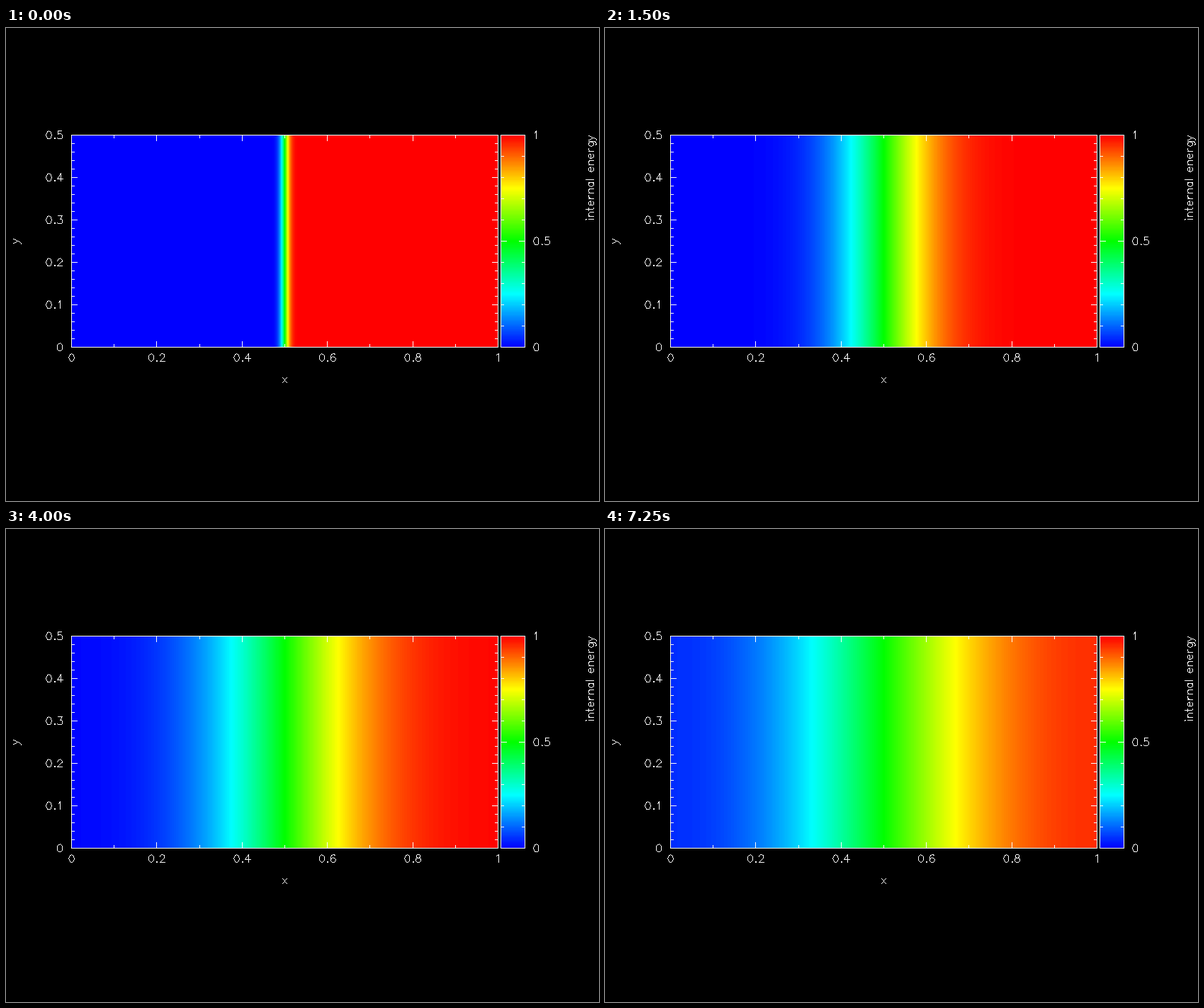
Recreate the animation shown at these times as a matplotlib script. Size 837 by 669 pixels, loop 7.5 s.

```python
import math
import numpy as np
import matplotlib.pyplot as plt
from matplotlib.animation import FuncAnimation
from matplotlib.colors import LinearSegmentedColormap, ListedColormap

W, H, DPI = 837, 669, 64
LEFT, RIGHT, TOP, BOTTOM = 92, 694, 151, 451
BAR_L, BAR_R = 698, 732
CAP, MID = 21, 14                        # capital and small letter heights
SCALE = 0.52                             # pixels per glyph unit
STEP_MS, STEPS = 250, 30
VAR_START, VAR_RATE = 0.00012, 0.00217   # squared width of the front

ink = np.zeros((H, W))


def stroke(points):
    """Rasterise a polyline, one pixel wide."""
    p = np.floor(np.array(points, float)).astype(int)
    for a, b in zip(p, p[1:]):
        n = max(abs(b - a).max(), 1)
        t = np.linspace(0, 1, n + 1)[:, None]
        x, y = np.floor(a + (b - a) * t + 0.5).astype(int).T
        ink[y, x] = 1


def arc(cx, cy, rx, ry, start=0, end=360):
    a = np.radians(np.linspace(start, end, 13))
    return list(zip(cx + rx * np.cos(a), cy + ry * np.sin(a)))


def stem(x, top=MID):
    return [(x, top), (x, 0)]


def dot(x, y):
    return arc(x, y, 1, 1)


def glyph(c):
    """Strokes of one single-line character on its baseline."""
    bowl = arc(9, 7, 6, 7)
    match c:
        case ".": return [dot(6, 1)]
        case "0": return [arc(10, 10.5, 7, 10.5)]
        case "1": return [[(6, 17), *stem(11, CAP)]]
        case "2": return [arc(10, 15, 6, 6, 180, -35) + [(3, 0), (17, 0)]]
        case "3": return [[(5, CAP), (16, CAP), *arc(10, 6.5, 7, 6.5, 90, -150)]]
        case "4": return [stem(13, CAP), [(13, CAP), (3, 7), (18, 7)]]
        case "5": return [[(15, CAP), (5, CAP), *arc(10, 7, 7, 7, 140, -150)]]
        case "6": return [arc(11, 10.5, 7, 10.5, 50, 180) + arc(10.5, 6.5, 6.5, 6.5, 180, 540)]
        case "8": return [arc(10, 16.5, 5.5, 4.5), arc(10, 6, 7, 6)]
        case "a": return [stem(15), bowl]
        case "e": return [[(3, 8), *arc(9, 7, 6, 7, 8, 318)]]
        case "g": return [bowl, [(15, MID), *arc(10, -2, 5, 5, 0, -140)]]
        case "i": return [stem(4), dot(4, CAP)]
        case "l": return [stem(4, CAP)]
        case "n": return [stem(4), arc(9.5, 8, 5.5, 6, 180, 0) + [(15, 0)]]
        case "r": return [stem(4), arc(11, 7, 7, 7, 180, 80)]
        case "t": return [[(5, CAP), *arc(9, 4, 4, 4, 180, 280)], [(2, MID), (9, MID)]]
        case "x": return [[(3, MID), (14, 0)], [(14, MID), (3, 0)]]
        case "y": return [[(2, MID), (8, 0)], [(14, MID), (8, 0), (5, -6), (1, -7)]]
    return []


def advance(c, strokes):
    if c.isdigit():
        return 20
    return 3 + max((x for pts in strokes for x, _ in pts), default=13)


def text(s, x, y, align=0.0, upright=True):
    """Write s with its baseline at (x, y); align 0 start, 0.5 middle, 1 end."""
    shapes = [glyph(c) for c in s]
    widths = [advance(c, g) for c, g in zip(s, shapes)]
    pen = -align * sum(widths)
    for strokes, width in zip(shapes, widths):
        for pts in strokes:
            u, v = (np.array(pts) + (pen, 0)).T * SCALE
            stroke(np.column_stack([x + u, y - v] if upright else [x - v, y - u]))
        pen += width


def box(x0, x1):
    stroke([(x0, TOP), (x1, TOP), (x1, BOTTOM), (x0, BOTTOM), (x0, TOP)])


def x_ticks(count, major):
    for i in range(1, count):
        x = round(LEFT + (RIGHT - LEFT) * i / count)
        n = 4 if i % major else 8
        stroke([(x, TOP), (x, TOP + n)])
        stroke([(x, BOTTOM), (x, BOTTOM - n)])


def y_ticks(x0, x1, count, major):
    for i in range(1, count):
        y = round(BOTTOM - (BOTTOM - TOP) * i / count)
        n = 4 if i % major else 8
        stroke([(x0, y), (x0 + n, y)])
        stroke([(x1, y), (x1 - n, y)])


def draw_axes():
    box(LEFT, RIGHT)
    box(BAR_L, BAR_R)
    x_ticks(10, 2)
    y_ticks(LEFT, RIGHT, 25, 5)
    y_ticks(BAR_L, BAR_R, 10, 5)
    base = BOTTOM + 5.9
    for i in range(6):
        text(f"{i / 5:g}", LEFT + (RIGHT - LEFT) * i / 5 + 0.5, 471.5, 0.5)
        text(f"{i / 10:g}", 81.3, base - 60 * i, 1)
    for i in range(3):
        text(f"{i / 2:g}", 743, base - 150 * i)
    text("x", 393.5, 501.5, 0.5)
    text("y", 17.5, 301.5, 0.5, upright=False)
    text("internal energy", 829.5, 150.5, 1, upright=False)


erf = np.vectorize(math.erf)
xs = np.linspace(0, 1, RIGHT - LEFT + 1)


def energy(step):
    """Diffused step at x = 0.5 between two insulated walls."""
    width = math.sqrt(2 * (VAR_START + VAR_RATE * step))
    total = sum(erf((xs - 0.5 - m) / width) - erf((xs - 1.5 - m) / width)
                for m in (-2, 0, 2))
    return total[None, :] / 2


def held_step(frame):
    """Each third of the loop skips one more step between updates."""
    third, pos = divmod(frame, 10)
    return frame - pos % (third + 1)


fig = plt.figure(figsize=(W / DPI, H / DPI), dpi=DPI, facecolor="black")
ax = fig.add_axes([0, 0, 1, 1])
ax.axis("off")

rainbow = LinearSegmentedColormap.from_list(
    "rainbow_bar", ["blue", "cyan", "lime", "yellow", "red"])
style = dict(vmin=0, vmax=1, interpolation="nearest", aspect="auto")
field = ax.imshow(energy(0), cmap=rainbow,
                  extent=(LEFT, RIGHT + 1, BOTTOM + 1, TOP), **style)
ax.imshow(np.linspace(1, 0, BOTTOM - TOP + 1)[:, None], cmap=rainbow,
          extent=(BAR_L, BAR_R + 1, BOTTOM + 1, TOP), **style)

draw_axes()
ax.imshow(np.ma.masked_equal(ink, 0), cmap=ListedColormap(["white"]),
          extent=(0, W, H, 0), **style)
ax.set_xlim(0, W)
ax.set_ylim(H, 0)


def update(frame):
    field.set_data(energy(held_step(frame)))
    return [field]


anim = FuncAnimation(fig, update, frames=STEPS, interval=STEP_MS,
                     repeat=True, repeat_delay=0)
plt.show()
```
